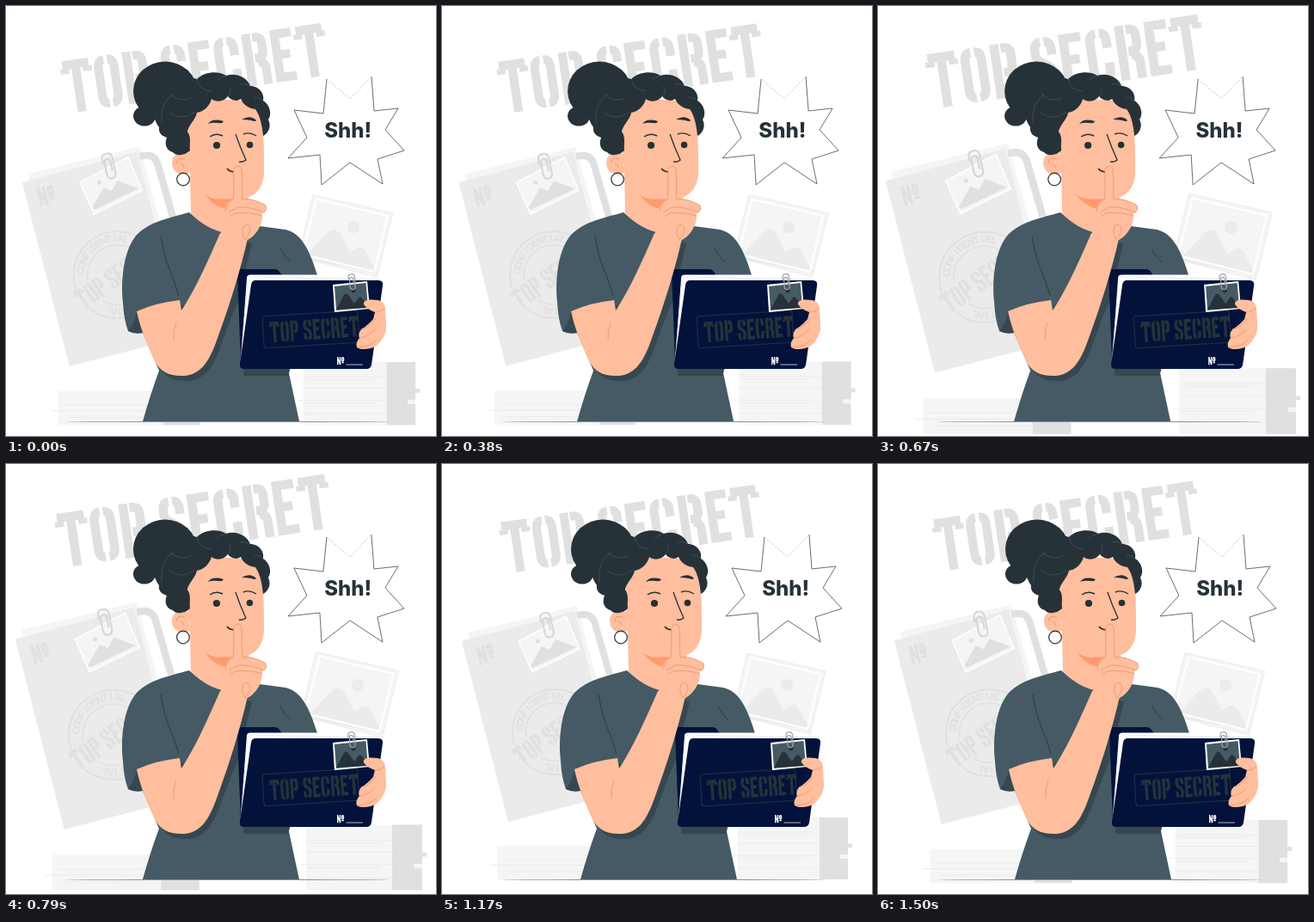
An HTML page with a canvas for the animation above (1540 ms loop, 500x500 px).

```html
<!DOCTYPE html>
<html lang="en">
<head>
<meta charset="utf-8">
<title>Top secret</title>
<style>
html, body { margin: 0; width: 100%; height: 100%; overflow: hidden; background: #fff; }
canvas { display: block; width: 100vmin; height: 100vmin; }
</style>
</head>
<body>
<canvas id="stage"></canvas>
<script>
const canvas = document.getElementById('stage');
const ctx = canvas.getContext('2d');
const density = Math.max(1, window.devicePixelRatio || 1);
canvas.width = canvas.height = 500 * density;

const DARK = '#263238', SHIRT = '#455a64', SHADE = '#37474f', NAVY = '#02123b';
const SKIN = '#ffbe9d', BLUSH = '#ff9a6c', CREASE = '#eb996e';
const GREY = '#e0e0e0', PALE = '#ebebeb', FAINT = '#f5f5f5';

const LOOP = 1540, STEP = 1000 / 24, CYCLE = 1500, LEAD = 28;
const PULSE = [[0, 1], [.1, 1.1], [.3, 1], [.4, 1], [.5, 1.1], [.6, 1], [1, 1]];
const SHAKE = [0, -1, 2, -4, 4, -4, 4, -4, 2, -1, 0].map((x, i) => [i / 10, x]);

function tween(keys, p) {
  const i = Math.max(1, keys.findIndex(k => k[0] >= p));
  const [p0, a] = keys[i - 1], [p1, b] = keys[i];
  return a + (b - a) * (p - p0) / (p1 - p0);
}

function fill(color, d) {
  ctx.fillStyle = color;
  ctx.fill(new Path2D(d));
}

function line(color, width, d) {
  ctx.strokeStyle = color;
  ctx.lineWidth = width;
  ctx.stroke(new Path2D(d));
}

function dot(color, x, y, rx, ry = rx) {
  ctx.fillStyle = color;
  ctx.beginPath();
  ctx.ellipse(x, y, rx, ry, 0, 0, 7);
  ctx.fill();
}

function ring(color, width, x, y, r) {
  ctx.strokeStyle = color;
  ctx.lineWidth = width;
  ctx.beginPath();
  ctx.arc(x, y, r, 0, 7);
  ctx.stroke();
}

function at(x, y, degrees, draw, sx = 1, sy = sx) {
  ctx.save();
  ctx.translate(x, y);
  ctx.rotate(degrees * Math.PI / 180);
  ctx.scale(sx, sy);
  draw();
  ctx.restore();
}

// Stencil letters: advance width and strokes in a 60-unit-high cell
const GLYPHS = {
  T: [32, 'M1 5H31M16 5V60M3 9V15M29 9V15'],
  O: [28, 'M12 5Q5 5 5 14V46Q5 55 12 55M16 5Q23 5 23 14V46Q23 55 16 55'],
  P: [28, 'M6 0V60M13 5H16Q23 5 23 13V23Q23 32 16 32H13'],
  S: [28, 'M23 20V14Q23 5 16 5M12 5Q5 5 5 14V18Q5 24 12 28L16 31Q23 35 23 42V46Q23 55 16 55M12 55Q5 55 5 46V40'],
  E: [24, 'M24 5H5V55H24M5 29H20'],
  C: [28, 'M23 22V14Q23 5 16 5M12 5Q5 5 5 14V46Q5 55 12 55M16 55Q23 55 23 46V38'],
  R: [29, 'M6 0V60M13 5H16Q23 5 23 13V21Q23 29 16 29H13M16 33Q24 34 24 43V60'],
  N: [28, 'M5 60V0M23 60V0M5 4L23 56'],
  'º': [20, 'M10 4Q4 4 4 12V24Q4 32 10 32Q16 32 16 24V12Q16 4 10 4ZM2 43H18']
};

function stencil(text, color, width = 10) {
  let x = 0;
  for (const char of text) {
    if (char === ' ') { x += 12; continue; }
    const [advance, d] = GLYPHS[char];
    at(x, 0, 0, () => line(color, width, d));
    x += advance + 4.5;
  }
}

function arcText(text, radius, middle, spread) {
  [...text].forEach((char, i) => {
    const angle = middle + spread * (i / (text.length - 1) - .5);
    at(0, 0, angle, () => ctx.fillText(char, 0, -radius));
  });
}

function stamp() {
  ring(GREY, 2, 0, 0, 49.5);
  ring(GREY, 1.5, 0, 0, 34);
  ctx.fillStyle = GREY;
  ctx.font = '700 11px Inter, sans-serif';
  ctx.textAlign = 'center';
  arcText('CONFIDENTIAL', 38, 0, 98);
  arcText('CONFIDENTIAL', 38, 180, 98);
  fill(PALE, 'M-56 -14H56V14H-56Z');
  at(-54, -12, 0, () => stencil('TOP SECRET', GREY), .36, .4);
}

function clip(color, width) {
  line(color, width, 'M-5 -4V-9Q-5 -15 1 -15Q7 -15 7 -9V8Q7 14 2 14Q-3 14 -3 8V-5Q-3 -9 1 -9Q4 -9 4 -5V6');
}

function paperStack(x, y, right, bottom) {
  ctx.fillStyle = FAINT;
  ctx.fillRect(x, y, right - x, bottom - y);
}

function background() {
  at(67, 68, -8.45, () => stencil('TOP SECRET', GREY));

  fill(FAINT, 'M30 196L157 165L180 250L42 250Z');
  line(GREY, 8, 'M157 176L165 175Q175 175 178 186L195 245');
  fill(PALE, 'M23 206L154 171L208 382L77 416Z');
  at(39, 213, -14, () => stencil('Nº', GREY, 9), .36);
  at(131.5, 311.5, -35, stamp);

  fill(FAINT, 'M89 206L144 177L160 215L105 242Z');
  fill(GREY, 'M103 235L116 212L125 216L132 204L156 213L106 237Z');
  dot(GREY, 111, 206, 2.5);
  line('#fff', 1.5, 'M89 206L144 177L160 215L105 242Z');
  at(121, 188, -12, () => clip('#d6d6d6', 2));

  fill(FAINT, 'M355 220L446 241L428 314L338 291Z');
  fill(PALE, 'M344 293L371 264Q381 255 387 266L397 286L405 281Q411 278 415 285L429 310Z');
  dot(PALE, 401, 257, 7);
  line(PALE, 1, 'M355 220L446 241L428 314L338 291Z');
  line('#fff', 2, 'M359 225L440 244L425 308L343 288Z');

  paperStack(64, 444, 226, 483);
  fill(GREY, 'M184 444H226V483H184Z');
  line(PALE, 1, 'M70 460H184M56 466.5H184M76 474H184');
  paperStack(344, 411, 472, 483);
  fill(GREY, 'M439 411H472V441.5H477V446H472V454H463V459H472V483H439Z');
  line(PALE, 1, 'M344 428H439M350 431H424M344 441H439M338 455H439M344 458H425M344 470H439');
}

const ARM = 'M152 355Q174 345 202 342L204 354C220 330 236 294 249 264L281 270' +
  'C273 306 261 345 246 386C236 415 226 428 208 430C190 431 179 425 173 413C164 394 156 374 152 355Z';
const TORSO = 'M213 240C192 246 168 250 152 266C137 283 133 318 136 345Q137 365 142 378Q150 381 159 380' +
  'L178 424Q168 451 159 483H341L329 427L362 313C353 283 343 264 325 260L295 256Q276 265 256 264Q232 258 213 240Z';

function body() {
  fill(SHIRT, TORSO);
  ctx.save();
  ctx.clip(new Path2D(TORSO));
  at(5, 6, 0, () => fill(SHADE, ARM));
  fill(SHADE, 'M270 300L253 386Q262 360 276 331V430H329V414Z');
  ctx.restore();
  fill(SHADE, 'M152 355L159 380Q149 382 142 378Q150 368 152 355Z');
  line(DARK, .8, 'M180 268Q184 292 190 306T201 337M319 282Q324 292 331 298');
}

function head() {
  dot(DARK, 185, 99, 37, 34.5);
  dot(DARK, 161, 128, 13, 11.5);
  fill(SKIN, 'M213 150L215 241Q233 260 256 264L284 264L282 215Z');
  fill(BLUSH, 'M231 218Q240 229 264 222L258 236Q241 234 231 218Z');
  fill(SKIN, 'M212 105L296 112C300 142 300 170 300 194C299 212 290 222 274 224C254 226 238 223 230 217L212 180Z');
  fill(SKIN, 'M213 172C204 168 193 172 193 182C193 193 202 199 214 194Z');
  line(CREASE, 1, 'M208 178Q198 175 199 183M203 183Q206 183 207 188');
  ring(DARK, 1.2, 206, 201.5, 7.3);
  fill(DARK, 'M178 141C166 125 173 105 190 102C191 88 207 80 222 85C232 75 249 76 256 81' +
    'C268 77 281 84 284 93C294 93 301 102 299 110C306 114 310 125 305 132C309 140 305 148 299 151' +
    'C298 141 296 128 290 120C282 119 276 115 273 108C268 112 261 109 258 105C253 112 244 112 239 108' +
    'C237 116 230 123 222 124C220 133 213 137 211 146C216 153 213 161 214 168' +
    'C208 174 198 175 194 170C186 168 184 160 187 153C180 151 177 146 178 141Z');
  line(SHIRT, .7, 'M181 137Q179 112 194 103M190 102Q202 113 215 107M222 85Q224 98 239 99M256 81Q248 83 245 87' +
    'M190 124Q205 135 220 123M284 93Q278 89 272 91M299 110Q294 105 288 106M258 105Q264 99 259 94');

  dot(DARK, 245, 162, 4.1);
  dot(DARK, 283.5, 161.5, 3.8);
  line(DARK, 1.4, 'M237 152Q244 147 252 151M276 149Q283 146 291 151');
  fill(DARK, 'M235 137Q240 130 253 134Q252 137 247 136Q240 135 235 137Z');
  fill(DARK, 'M274 132Q284 126 291 133Q290 135 285 133Q279 132 274 132Z');
  line(DARK, 1.3, 'M267 149Q272 164 279 179Q276 182 271 181');
  line(DARK, 1.6, 'M257 189Q260 193 267 193');
}

function arm() {
  fill(SKIN, ARM);
  fill(SKIN, 'M264 225C266 212 264 198 265 190C267 185 273 185 274 191C275 204 274 215 275 225' +
    'C285 223 298 229 302 232Q304 237 300 240Q297 240 298 246C297 257 290 267 281 272Q263 279 247 270' +
    'Q254 256 254 245C253 234 257 227 264 225Z');
  line(CREASE, .9, 'M264 225C266 212 264 198 265 190C267 185 273 185 274 191C275 204 274 215 275 225' +
    'C285 223 298 229 302 232Q304 237 300 240Q284 233 269 234L259 240M298 244Q283 239 266 241L260 245' +
    'M264 225Q257 227 255 239M276 256Q273 264 278 272M276 256Q283 251 284 261Q282 268 278 272M198 368Q194 378 195 389');
}

function folder() {
  fill(NAVY, 'M274 306H313Q317 306 320 312L324 321L285 330L273 416L269 310Q269 306 274 306Z');
  fill('#fff', 'M284 312.5H403L434 319L287 324L273 412L280 316Q280 312.5 284 312.5Z');
  line(GREY, .6, 'M282 315L434 318M281 318L273 412');
  fill(NAVY, 'M290 319H433Q439 319 438 325L425 417Q424 422 419 422H277Q271 422 272 416L285 324Q286 319 290 319Z');

  at(354.5, 376, -3.5, () => {
    ctx.strokeStyle = DARK;
    ctx.lineWidth = 1;
    ctx.beginPath();
    ctx.roundRect(-55.5, -18.5, 111, 37, 3);
    ctx.stroke();
  });
  at(306, 367.5, -4, () => stencil('TOP SECRET', DARK), .344, .4);
  at(385, 408, 0, () => stencil('Nº', '#fff', 9), .155);
  line('#fff', .7, 'M395.5 417H415');

  fill('#fff', 'M380 324L420 320L423 352L382 356Z');
  fill(SHIRT, 'M382 326L418.500 322L421 350.500L384 354Z');
  fill(DARK, 'M384 353L393 336Q395 333 398 336L405 346L410 339Q412 337 414 340L421 349V351Z');
  dot(DARK, 404, 331, 2.5);
  at(401.5, 321, -4, () => clip('#a6a6a6', 2), .62);
}

function grip() {
  fill(SKIN, 'M416 347C415 341 424 341 432 342Q440 343 441 352L442 371C443 382 436 390 431 395' +
    'C424 400 411 400 408 397Q406 392 411 386Q409 381 413 376Q420 372 427 364L429 356Q420 353 416 347Z');
  line(CREASE, .9, 'M411 386Q421 385 429 376M413 376Q424 373 430 363M429 356Q437 356 440 351M409 397Q425 396 431 388');
}

function bubble() {
  const star = 'M400 108L425 82L428 122L456 119L441 144L463 168L432 178L438 207L400 182L367 208L365 173' +
    'L328 177L350 153L335 121L369 125L373 85';
  fill('#fff', star + 'Z');
  line(DARK, .7, 'M425 82L428 122L456 119L441 144L463 168L432 178L438 207L400 182L367 208L365 173' +
    'L328 177L350 153L335 121L369 125L373 85');
  ctx.setLineDash([2, 2]);
  line('#90999d', .6, 'M373 85L400 108L425 82');
  ctx.setLineDash([]);
  ctx.fillStyle = DARK;
  ctx.font = '800 24px Inter, sans-serif';
  ctx.textAlign = 'center';
  ctx.fillText('Shh!', 397.7, 153);
}

function render(time) {
  const frame = Math.min(36, Math.floor((time % LOOP + 5) / STEP));
  const phase = (frame * STEP + LEAD) % CYCLE / CYCLE;
  ctx.setTransform(density, 0, 0, density, 0, 0);
  ctx.fillStyle = '#fff';
  ctx.fillRect(0, 0, 500, 500);

  at(250, 250, 0, () => {
    ctx.translate(-250, -250);
    background();
  }, tween(PULSE, phase));
  dot('#8d969a', 257, 483.4, 189, .6);
  at(.2 + tween(SHAKE, phase), 0, 0, () => {
    body();
    head();
    folder();
    arm();
    grip();
    bubble();
  });
}

const start = performance.now();
function tick() {
  render(performance.now() - start);
  requestAnimationFrame(tick);
}
tick();
</script>
</body>
</html>
```
